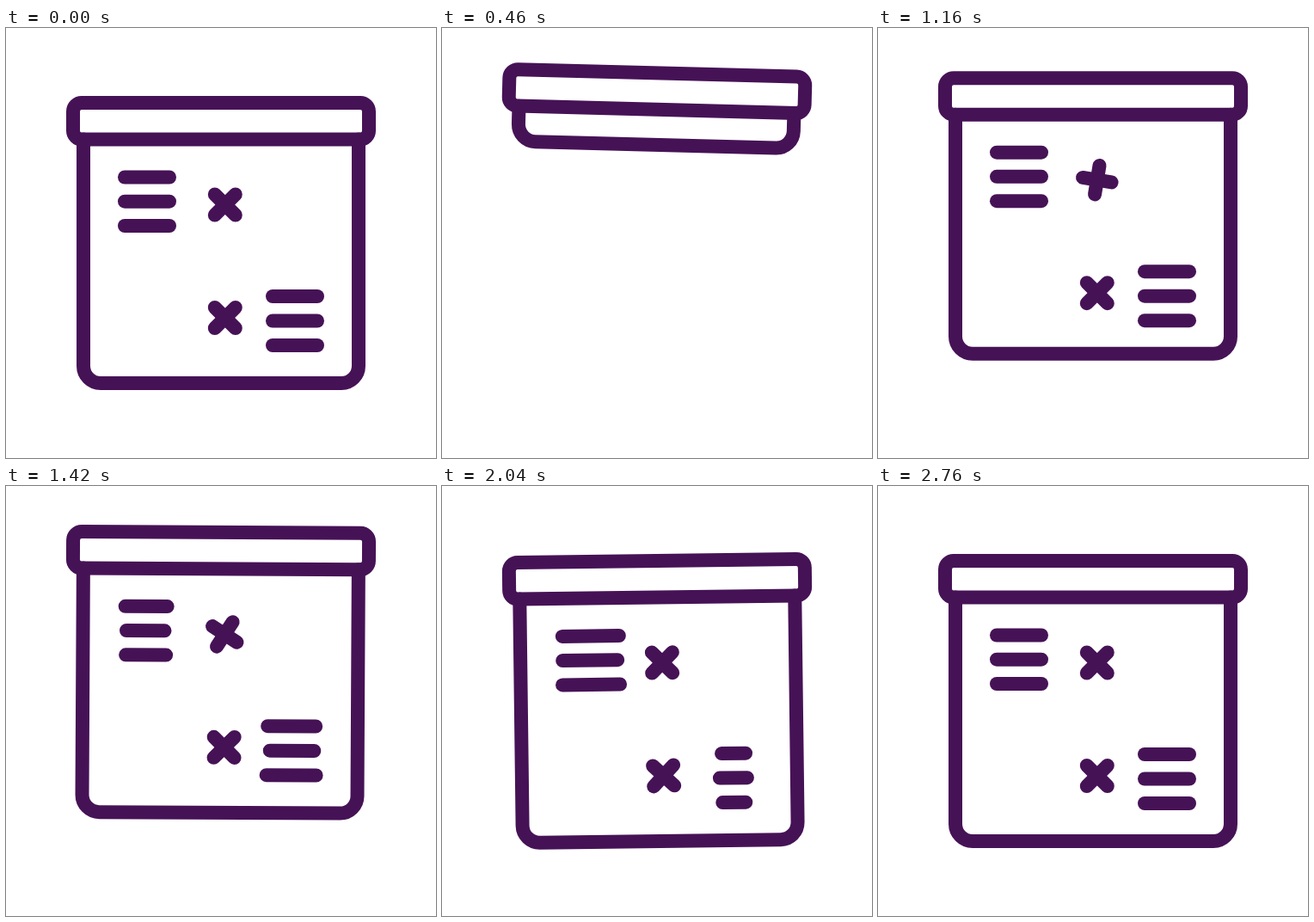
An HTML page with a canvas for the animation above (2940 ms loop, 500 by 500 pixels).

```html
<!DOCTYPE html>
<html lang="en">
<head>
<meta charset="utf-8">
<title>Strategy board</title>
<style>
  html, body { margin: 0; width: 100%; height: 100%; overflow: hidden; background: #fff; }
  canvas { display: block; width: 500px; height: 500px; }
</style>
</head>
<body>
<canvas id="stage" width="500" height="500"></canvas>
<script>
const ctx = document.getElementById('stage').getContext('2d');
const LOOP = 2940;
const STEP = 20;
const INK = '#461256';
const PIVOT = { x: 250, y: 108 };
const TOP = 129.5;
const FULL = 283.5;

const clamp = p => Math.min(1, Math.max(0, p));
const smooth = p => (1 - Math.cos(Math.PI * clamp(p))) / 2;
const easeOut = p => 1 - (1 - clamp(p)) ** 2;
const mix = (a, b, p) => a + (b - a) * p;

// Eased value through [time, value] keys, held outside them.
function track(keys, t) {
  if (t <= keys[0][0]) return keys[0][1];
  for (let i = 1; i < keys.length; i++) {
    const [t0, v0] = keys[i - 1], [t1, v1] = keys[i];
    if (t <= t1) return mix(v0, v1, smooth((t - t0) / (t1 - t0)));
  }
  return keys[keys.length - 1][1];
}

const LIFT = [[100, 0], [450, -34.7], [800, -9.5], [1360, -36.5], [1620, -9.5],
              [1750, -12.5], [2020, 0]];
const TILT = [[100, 0], [450, 1.5], [800, -0.8], [1160, 0], [1340, 0.5],
              [1640, -0.72], [1820, 0.3], [2040, -0.72], [2240, 0]];

// Each line: start x, y, then the end shifts [left, right] at the two swings.
const LINES = [
  { x: 138, y: 173.5, swing: [2, -4], back: [1, 15] },
  { x: 138, y: 201.7, swing: [5, -10], back: [1, 13] },
  { x: 138, y: 230, swing: [3.5, -6.5], back: [0.5, 15.5] },
  { x: 310, y: 312, swing: [-9.5, -1.5], back: [12.5, -11.5] },
  { x: 310, y: 340.5, swing: [-4, -5], back: [10, -10] },
  { x: 310, y: 369, swing: [-12, 0], back: [13, -12] }
];
const CROSSES = [
  { y: 205.5, start: 952 },
  { y: 337, start: 1515 }
];
const SPIN_TIME = 562;

function segment(x0, y0, x1, y1) {
  ctx.beginPath();
  ctx.moveTo(x0, y0);
  ctx.lineTo(x1, y1);
  ctx.stroke();
}

function bodyLength(t) {
  return t < 475
    ? mix(FULL, 40, smooth((t - 100) / 375))
    : mix(40, FULL, easeOut((t - 475) / 805));
}

function drawLine(line, t) {
  const shift = i => track(
    [[1200, 0], [1640, line.swing[i]], [2040, line.back[i]], [2760, 0]], t);
  segment(line.x + shift(0), line.y, line.x + 52 + shift(1), line.y);
}

function drawCross(cross, t) {
  ctx.save();
  ctx.translate(254.8, cross.y);
  ctx.rotate(Math.PI * smooth((t - cross.start) / SPIN_TIME));
  segment(-12, -12, 12, 12);
  segment(12, -12, -12, 12);
  ctx.restore();
}

function drawBoard(t) {
  const bottom = TOP + bodyLength(t);

  ctx.save();
  ctx.beginPath();
  ctx.rect(90, TOP, 320, bottom - TOP);
  ctx.clip();
  LINES.forEach(line => drawLine(line, t));
  CROSSES.forEach(cross => drawCross(cross, t));
  ctx.restore();

  ctx.beginPath();
  ctx.moveTo(90, TOP);
  ctx.arcTo(90, bottom, 250, bottom, 20);
  ctx.arcTo(410, bottom, 410, TOP, 20);
  ctx.lineTo(410, TOP);
  ctx.stroke();

  ctx.beginPath();
  ctx.roundRect(78, 87, 344, TOP - 87, 10);
  ctx.stroke();
}

function render(t) {
  ctx.fillStyle = '#fff';
  ctx.fillRect(0, 0, 500, 500);
  ctx.strokeStyle = INK;
  ctx.lineWidth = 16;
  ctx.lineCap = 'round';
  ctx.save();
  ctx.translate(PIVOT.x, PIVOT.y + track(LIFT, t));
  ctx.rotate(track(TILT, t) * Math.PI / 180);
  ctx.translate(-PIVOT.x, -PIVOT.y);
  drawBoard(t);
  ctx.restore();
}

const begin = performance.now();
function tick() {
  const t = (performance.now() - begin) % LOOP;
  render(Math.floor(t / STEP) * STEP);
  requestAnimationFrame(tick);
}
tick();
</script>
</body>
</html>
```
